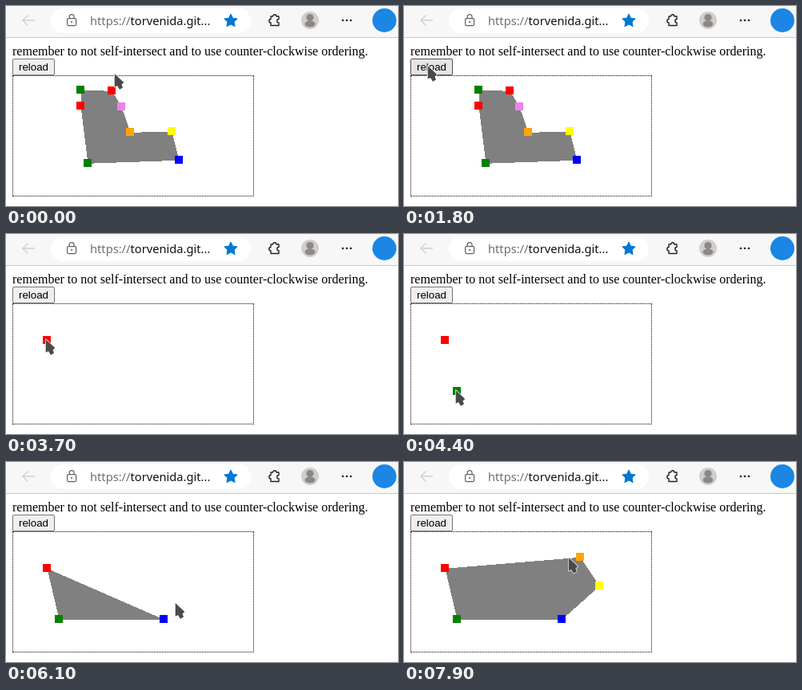
Write an HTML page that moves like this. It is 490 px wide and 251 px high and loops after 8 s.

```html
<!DOCTYPE html>
<html lang="en">
<head>
<meta charset="utf-8">
<title>Polygon editor</title>
<style>
html, body { margin: 0; width: 100%; height: 100%; overflow: hidden; background: #fff; }
svg { position: absolute; left: 0; top: 0; }
p, button, .board { position: absolute; left: 8px; margin: 0; box-sizing: border-box; pointer-events: none; }
p { top: 48px; font: 16px/18px "Liberation Serif", serif; white-space: nowrap; }
button {
  top: 66px; width: 53px; height: 21px; padding: 0; text-align: center;
  font: 13.333px/19px "Liberation Sans", sans-serif; color: #000;
  background: #efefef; border: 1px solid #767676; border-radius: 2px;
}
button.hover { background: #e5e5e5; border-color: #4f4f4f; }
button.press { background: #f5f5f5; border-color: #8d8d8d; }
.board { top: 87px; width: 302px; height: 152px; border: 1px dotted #000; }
</style>
</head>
<body>
<svg width="490" height="40">
  <rect width="490" height="40" fill="#f7f7f7"/>
  <rect y="39" width="490" height="1" fill="#c9c9c9"/>
  <rect x="56" y="3" width="250" height="31" rx="15.5" fill="#fff"/>
  <path d="M36 18H21M27.500 11.500L21 18l6.500 6.500" fill="none" stroke="#cfcfcf" stroke-width="1.3"/>
  <g fill="none" stroke="#5f5f5f" stroke-width="1.2">
    <rect x="76.600" y="15.600" width="11" height="9" rx="1.500"/>
    <path d="M79.200 15.500v-2a2.900 2.900 0 0 1 5.800 0v2"/>
  </g>
  <circle cx="82.100" cy="20" r="1.100" fill="#5f5f5f"/>
  <text x="105" y="24" font-family="Noto Sans, sans-serif" font-size="14.667" fill="#111"><tspan fill="#707070">https://</tspan>torvenida.git...</text>
  <path d="M281 10l2.500 5.200 5.700.8-4.100 4 1 5.700-5.100-2.700-5.100 2.700 1-5.700-4.100-4 5.700-.8z" fill="#0078d4" stroke="#0078d4" stroke-linejoin="round"/>
  <path d="M331 13h2.500a2.200 2.200 0 0 1 4.400 0h3.100v3.500a2.200 2.200 0 0 0 0 4.400v3.600h-10v-3.600a2.200 2.200 0 0 1 0-4.400z" fill="none" stroke="#222" stroke-width="1.4" stroke-linejoin="round"/>
  <circle cx="380" cy="18" r="11" fill="#d0cecc"/>
  <g fill="#8b8886"><circle cx="380" cy="14.500" r="4.600"/><ellipse cx="380" cy="22.500" rx="6.500" ry="4"/></g>
  <g fill="#222"><circle cx="421" cy="18" r="1.300"/><circle cx="426" cy="18" r="1.300"/><circle cx="431" cy="18" r="1.300"/></g>
  <circle cx="473" cy="18" r="15" fill="#1b86e3"/>
</svg>
<p>remember to not self-intersect and to use counter-clockwise ordering.</p>
<button tabindex="-1">reload</button>
<div class="board"></div>
<svg width="490" height="251">
  <polygon id="area" fill="#808080" shape-rendering="crispEdges" transform="translate(.5 .75)"/>
  <g id="handles"></g>
  <path id="cursor" d="M-1.300-1V15.700L2 14 5 18.700 9 16.500 7.500 12.500 10.300 10z" fill="#4a4a4a" stroke="#fff" stroke-width="1.4" paint-order="stroke" stroke-linejoin="round"/>
</svg>
<script>
const LOOP = 8000, STEP = 100, RELOAD = 2100;
const colors = ['red', 'green', 'blue', 'yellow', 'orange', 'violet'];
const before = [[93, 125], [102, 197], [216, 193], [207, 157], [155, 158], [144, 126], [132, 106], [93, 105]];
const [red, green, blue, yellow, orange] = [[51, 133], [66, 197], [197, 197], [244, 155], [220, 119]];
const clicks = [
  { at: 3700, point: red }, { at: 4400, point: green }, { at: 5700, point: blue },
  { at: 7000, point: yellow }, { at: 7700, point: orange }
];

// Eased pointer strokes, straight unless bent towards a control point
const home = [137, 86];
const strokes = [
  { at: 500, steps: 7, to: [31, 76], bend: [102, 153] },
  { at: 2500, steps: 9, to: red, bend: [151, 213] },
  { at: 3800, steps: 3, to: green },
  { at: 4600, steps: 5, to: [188, 216], bend: [112, 220] },
  { at: 5200, steps: 2, to: blue },
  { at: 6000, steps: 4, to: [223, 153], bend: [216, 181] },
  { at: 6500, steps: 2, to: yellow },
  { at: 7100, steps: 5, to: orange },
  { at: 7900, steps: 1, to: [207, 121] }
];

const find = s => document.querySelector(s);
const area = find('#area'), handles = find('#handles'), cursor = find('#cursor'), button = find('button');
const ease = p => p * p * (3 - 2 * p);

function pointer(t) {
  const i = strokes.findLastIndex(s => s.at <= t);
  if (i < 0) return home;
  const { at, steps, to, bend } = strokes[i];
  const from = i ? strokes[i - 1].to : home;
  const p = ease(Math.min(1, (Math.floor((t - at) / STEP) + 1) / steps)), q = 1 - p;
  return from.map((a, k) => {
    const b = to[k], c = bend ? bend[k] : (a + b) / 2;
    return Math.round(q * q * a + 2 * q * p * c + p * p * b);
  });
}

function buttonState(t, [x, y]) {
  if (t >= 1600 && t < 1800) return 'press';
  const over = x >= 8 && x < 61 && y >= 66 && y < 87;
  const stale = t >= RELOAD && t < 2500; // no hover until the pointer moves again
  return over && !stale ? 'hover' : '';
}

function draw(now) {
  const t = now % LOOP, mouse = pointer(t);
  const points = t < RELOAD ? before : clicks.filter(c => c.at <= t).map(c => c.point);
  area.setAttribute('points', points.length > 2 ? points.join(' ') : '');
  handles.innerHTML = points.map(([x, y], i) =>
    `<rect x="${x - 5}" y="${y - 5}" width="10" height="10" fill="${colors[i % colors.length]}"/>`).join('');
  cursor.setAttribute('transform', `translate(${mouse})`);
  button.className = buttonState(t, mouse);
}

const begin = performance.now();
function tick() {
  draw(performance.now() - begin);
  requestAnimationFrame(tick);
}
tick();
</script>
</body>
</html>
```
